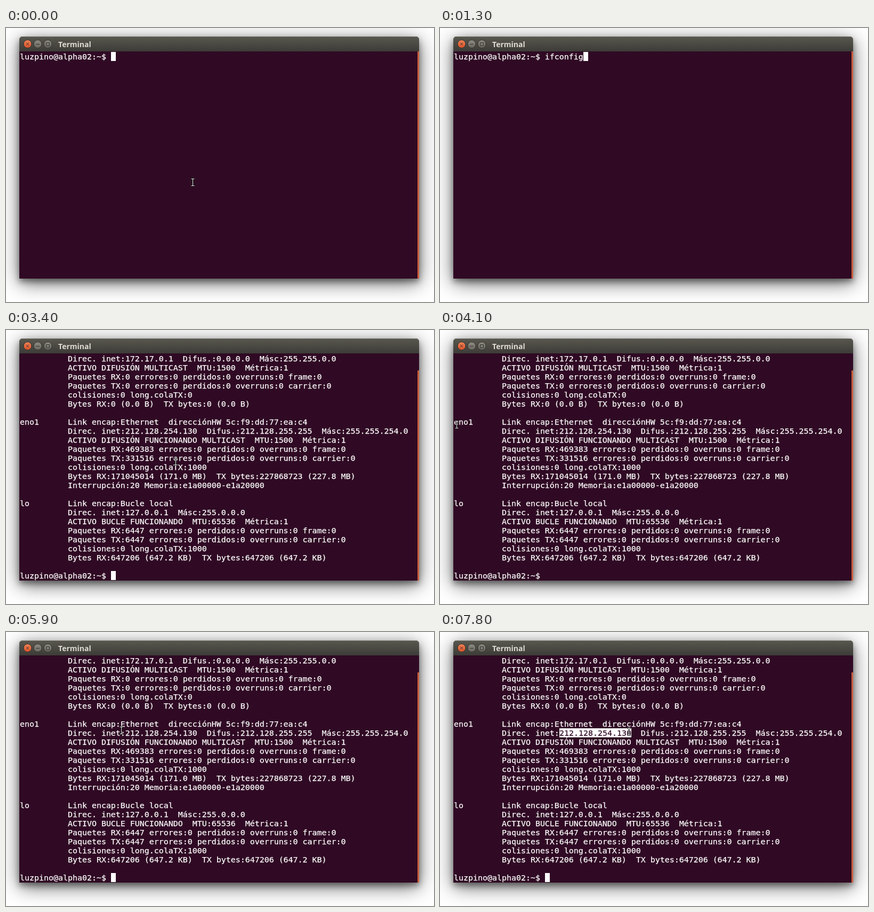
These frames come from a looping animation (803 by 515 pixels, 8000 ms). An HTML page:

```html
<!DOCTYPE html>
<html lang="es">
<head>
<meta charset="utf-8">
<title>Terminal</title>
<style>
  html, body { margin: 0; width: 803px; height: 515px; overflow: hidden; background: #fff; }
  body { position: relative; }
  body * { position: absolute; box-sizing: border-box; }
  .window {
    left: 25px; top: 16px; width: 750px; height: 455px;
    border-radius: 6px 6px 0 0; background: #300a24;
    box-shadow: 0 8px 36px rgba(0, 0, 0, .6), 0 6px 12px rgba(0, 0, 0, .4);
  }
  .bar {
    left: 0; top: 0; width: 750px; height: 28px; border-radius: 6px 6px 0 0;
    background: linear-gradient(#59584f, #3c3b37);
    box-shadow: inset 0 1px #6a685f;
  }
  .bar svg { left: 0; top: 0; }
  .bar b { left: 73px; top: 5px; font: 700 14px/20px "Open Sans", sans-serif; color: #dfdbd2; }
  #thumb { left: 772px; width: 3px; bottom: 44px; background: #cc5b3a; }
  pre, #sel {
    margin: 0; white-space: pre; color: #fff;
    font: 14.95px/17px "DejaVu Sans Mono", monospace;
    -webkit-text-stroke: .25px;
  }
  pre { left: 26px; top: 46px; }
  #caret { left: 0; top: 0; width: 9px; height: 17px; background: #fff; }
  #sel { left: 224px; top: 181px; height: 17px; padding-top: 1px; overflow: hidden; background: #fff; color: #300a24; }
  #beam { left: 0; top: 0; overflow: visible; }
</style>
</head>
<body>
<div class="window">
  <div class="bar">
    <svg width="90" height="28" fill="none">
      <defs>
        <linearGradient id="warm" x2="0" y2="1"><stop stop-color="#f18458"/><stop offset="1" stop-color="#dc5128"/></linearGradient>
        <linearGradient id="cool" x2="0" y2="1"><stop stop-color="#8d8b82"/><stop offset="1" stop-color="#69675f"/></linearGradient>
      </defs>
      <g stroke="#33322e">
        <circle cx="15.5" cy="14" r="7.5" fill="url(#warm)"/>
        <circle cx="34.5" cy="14" r="7.5" fill="url(#cool)"/>
        <circle cx="53.5" cy="14" r="7.5" fill="url(#cool)"/>
        <path d="M13 11.5l5 5m0-5l-5 5M31 14.5h7M50.5 11.5h6v6h-6z"/>
      </g>
    </svg>
    <b>Terminal</b>
  </div>
</div>
<div id="thumb"></div>
<pre id="text"></pre>
<div id="caret"></div>
<div id="sel">212.128.254.130</div>
<svg id="beam" width="1" height="1" fill="none">
  <path d="M-3 -6.5H4M-3 6.5H4M.5 -6.5V6.5" stroke="#000" stroke-width="3" stroke-opacity=".8"/>
  <path d="M-2.5 -6.5H3.5M-2.5 6.5H3.5M.5 -6.5V6.5" stroke="#fff"/>
</svg>
<script>
const $ = id => document.getElementById(id);
const text = $('text'), caret = $('caret'), sel = $('sel'), beam = $('beam'), thumb = $('thumb');
const LOOP = 8000, TICK = 100, COL = 9, ROW = 17, LEFT = 26, TOP = 45;
const TYPE = 400, RUN = 1800, MOVE = 3200, SELECT = 6600, BLINK = 600;
const prompt = 'luzpino@alpha02:~$ ';
// what is typed on each tick; an empty entry is a pause
const strokes = 'i f  c o n  fi  g'.split(' ');

// interface name, then its indented lines
const block = (name, ...lines) =>
  lines.map((s, i) => (i ? '' : name).padEnd(10) + s).join('\n');
const packets = (rx, tx, queue) => [
  `Paquetes RX:${rx} errores:0 perdidos:0 overruns:0 frame:0`,
  `Paquetes TX:${tx} errores:0 perdidos:0 overruns:0 carrier:0`,
  `colisiones:0 long.colaTX:${queue}`
];

const output = [
  block('',
    'Direc. inet:172.17.0.1  Difus.:0.0.0.0  Másc:255.255.0.0',
    'ACTIVO DIFUSIÓN MULTICAST  MTU:1500  Métrica:1',
    ...packets(0, 0, 0),
    'Bytes RX:0 (0.0 B)  TX bytes:0 (0.0 B)'),
  block('eno1',
    'Link encap:Ethernet  direcciónHW 5c:f9:dd:77:ea:c4',
    'Direc. inet:212.128.254.130  Difus.:212.128.255.255  Másc:255.255.254.0',
    'ACTIVO DIFUSIÓN FUNCIONANDO MULTICAST  MTU:1500  Métrica:1',
    ...packets(469383, 331516, 1000),
    'Bytes RX:171045014 (171.0 MB)  TX bytes:227868723 (227.8 MB)',
    'Interrupción:20 Memoria:e1a00000-e1a20000'),
  block('lo',
    'Link encap:Bucle local',
    'Direc. inet:127.0.0.1  Másc:255.0.0.0',
    'ACTIVO BUCLE FUNCIONANDO  MTU:65536  Métrica:1',
    ...packets(6447, 6447, 1000),
    'Bytes RX:647206 (647.2 KB)  TX bytes:647206 (647.2 KB)'),
  prompt
].join('\n\n');

// pointer stops: time, x, y
const stops = [
  [0, 350, 290], [MOVE + 200, 318, 247], [4100, 31, 178], [4800, 54, 173],
  [5200, 63, 169], [5900, 216, 185], [6500, 226, 189], [7800, 354, 187]
];

const clamp = v => Math.min(1, Math.max(0, v));
const ease = k => k * k * (3 - 2 * k);

function pointerAt(t) {
  if (t < MOVE) return stops[0].slice(1);
  const i = stops.findLastIndex(s => s[0] <= t);
  const a = stops[i], b = stops[i + 1] || a;
  const k = ease(clamp((t - a[0]) / (b[0] - a[0] || 1)));
  return [1, 2].map(n => Math.round(a[n] + (b[n] - a[n]) * k));
}

const move = (el, x, y) => { el.style.transform = `translate(${x}px, ${y}px)`; };
const show = (el, on) => { el.style.visibility = on ? 'visible' : 'hidden'; };

let shown;
function draw(now) {
  const t = Math.floor(now % LOOP / TICK) * TICK;
  const done = t >= RUN;
  const typed = strokes.slice(0, Math.max(0, (t - TYPE) / TICK + 1)).join('');
  const screen = done ? output : prompt + typed;
  if (screen !== shown) text.textContent = shown = screen;

  const lines = screen.split('\n');
  move(caret, LEFT + COL * lines.at(-1).length, TOP + ROW * (lines.length - 1));
  show(caret, !done || Math.floor((t - RUN) / BLINK) % 2 === 0);
  thumb.style.top = (done ? 76 : 44) + 'px';

  const [x, y] = pointerAt(t);
  move(beam, x, y);
  show(beam, t < TYPE || t >= MOVE);

  show(sel, t >= SELECT);
  sel.style.width = COL * Math.max(0, Math.ceil((x - LEFT) / COL) - 22) + 'px';
  requestAnimationFrame(draw);
}
draw(performance.now());
</script>
</body>
</html>
```
